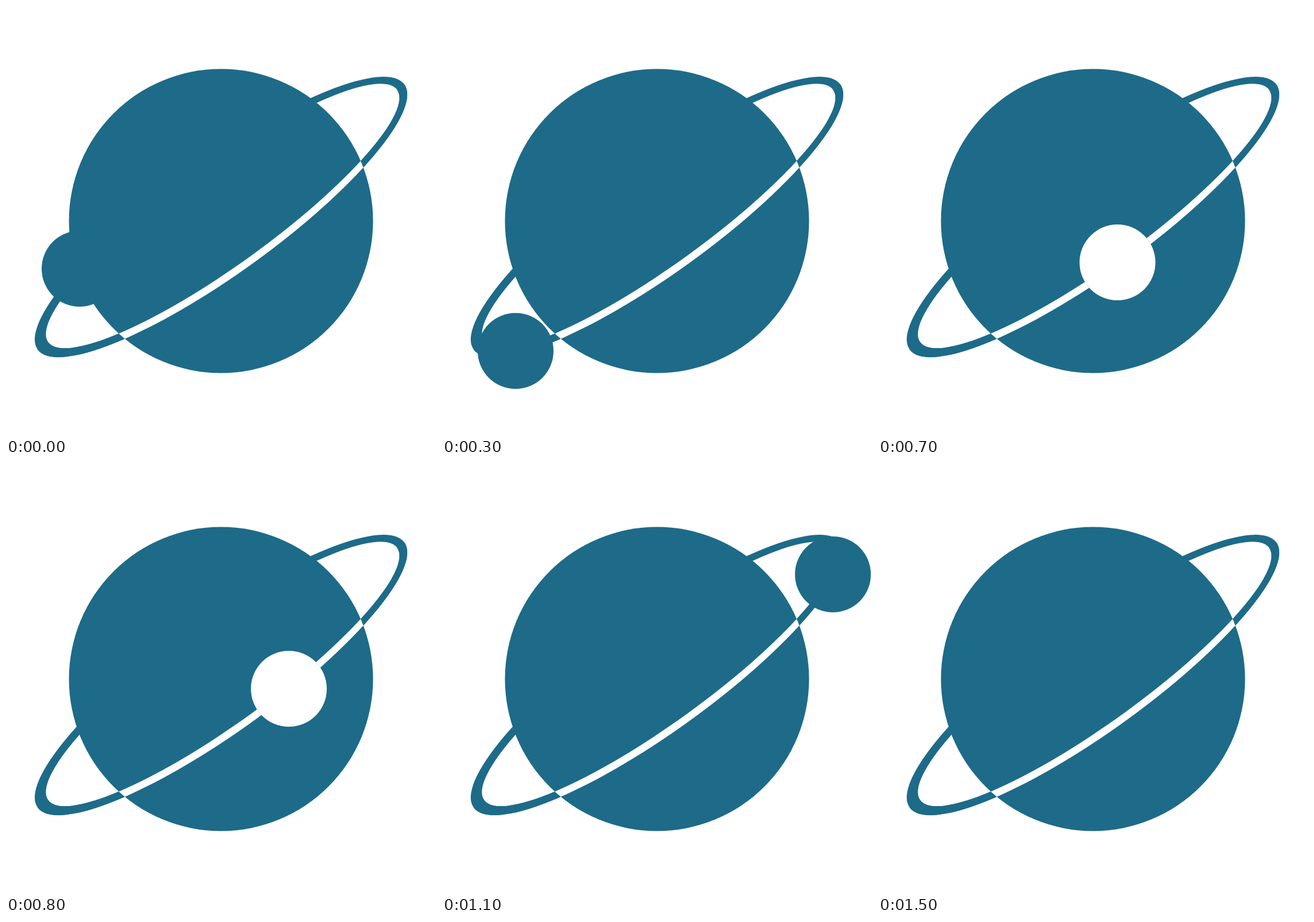
Write an HTML page with a canvas that moves like this. It is 748 by 748 pixels and loops after 1.6 s.

```html
<!DOCTYPE html>
<html lang="en">
<head>
<meta charset="utf-8">
<title>Planet and moon</title>
<style>
html, body { margin: 0; overflow: hidden; background: #fff; }
canvas { display: block; }
</style>
</head>
<body>
<canvas id="stage" width="748" height="748"></canvas>
<script>
const ctx = document.getElementById('stage').getContext('2d');
const BLUE = '#1d6b89', WHITE = '#fff', TILT = -35.88 * Math.PI / 180;
const LOOP = 1600, STEP = 100;

// Key points of the moon's closed path
const keys = [
  { t: 0, x: 128, y: 457 },
  { t: 300, x: 128, y: 600 },
  { t: 500, x: 260, y: 545 },
  { t: 800, x: 492, y: 391 },
  { t: 1000, x: 614, y: 270 },
  { t: 1100, x: 680, y: 192 },
  { t: 1200, x: 654, y: 138 },
  { t: 1300, x: 558, y: 149 }
];

// Key by index, continued before and after the loop
function key(i) {
  const n = keys.length, turn = Math.floor(i / n), k = keys[i - turn * n];
  return { ...k, t: k.t + turn * LOOP };
}

// Smooth curve through the keys: each tangent follows the two neighbours
function moonAt(t) {
  const i = keys.findLastIndex(k => k.t <= t);
  const [before, from, to, after] = [-1, 0, 1, 2].map(d => key(i + d));
  const span = to.t - from.t, p = (t - from.t) / span, q = 1 - p;
  const along = axis => {
    const leave = (to[axis] - before[axis]) / (to.t - before.t) * span;
    const arrive = (after[axis] - from[axis]) / (after.t - from.t) * span;
    return q * q * (1 + 2 * p) * from[axis] + p * p * (1 + 2 * q) * to[axis]
      + p * q * (q * leave - p * arrive);
  };
  return disc(along('x'), along('y'), 66);
}

function disc(x, y, r) {
  const path = new Path2D();
  path.arc(x, y, r, 0, 2 * Math.PI);
  return path;
}

// Half of the band between two tilted ellipses
function halfRing(start) {
  const path = new Path2D(), end = start + Math.PI;
  path.ellipse(374, 367, 393.6, 97.9, TILT, start, end);
  path.ellipse(376.9, 365.3, 374.5, 85, TILT, end, start, true);
  path.closePath();
  return path;
}

const planet = disc(374, 374, 264.5);
const frontRing = halfRing(0), backRing = halfRing(Math.PI);
const ring = new Path2D(frontRing);
ring.addPath(backRing);

function fill(path, color) {
  ctx.fillStyle = color;
  ctx.fill(path);
}

// Blue against the sky, white against the planet
function fillInFront(path) {
  fill(path, BLUE);
  ctx.save();
  ctx.clip(planet);
  fill(path, WHITE);
  ctx.restore();
}

function draw(now) {
  const t = Math.floor(now % LOOP / STEP) * STEP;
  const moon = moonAt(t), inFront = t >= 300 && t <= 1000;

  ctx.clearRect(0, 0, 748, 748);
  fill(ring, BLUE);
  if (!inFront) fill(moon, BLUE);
  fill(planet, BLUE);
  fillInFront(frontRing);
  if (inFront) fillInFront(moon);
}

const start = performance.now();
function tick() {
  draw(performance.now() - start);
  requestAnimationFrame(tick);
}
tick();
</script>
</body>
</html>
```
